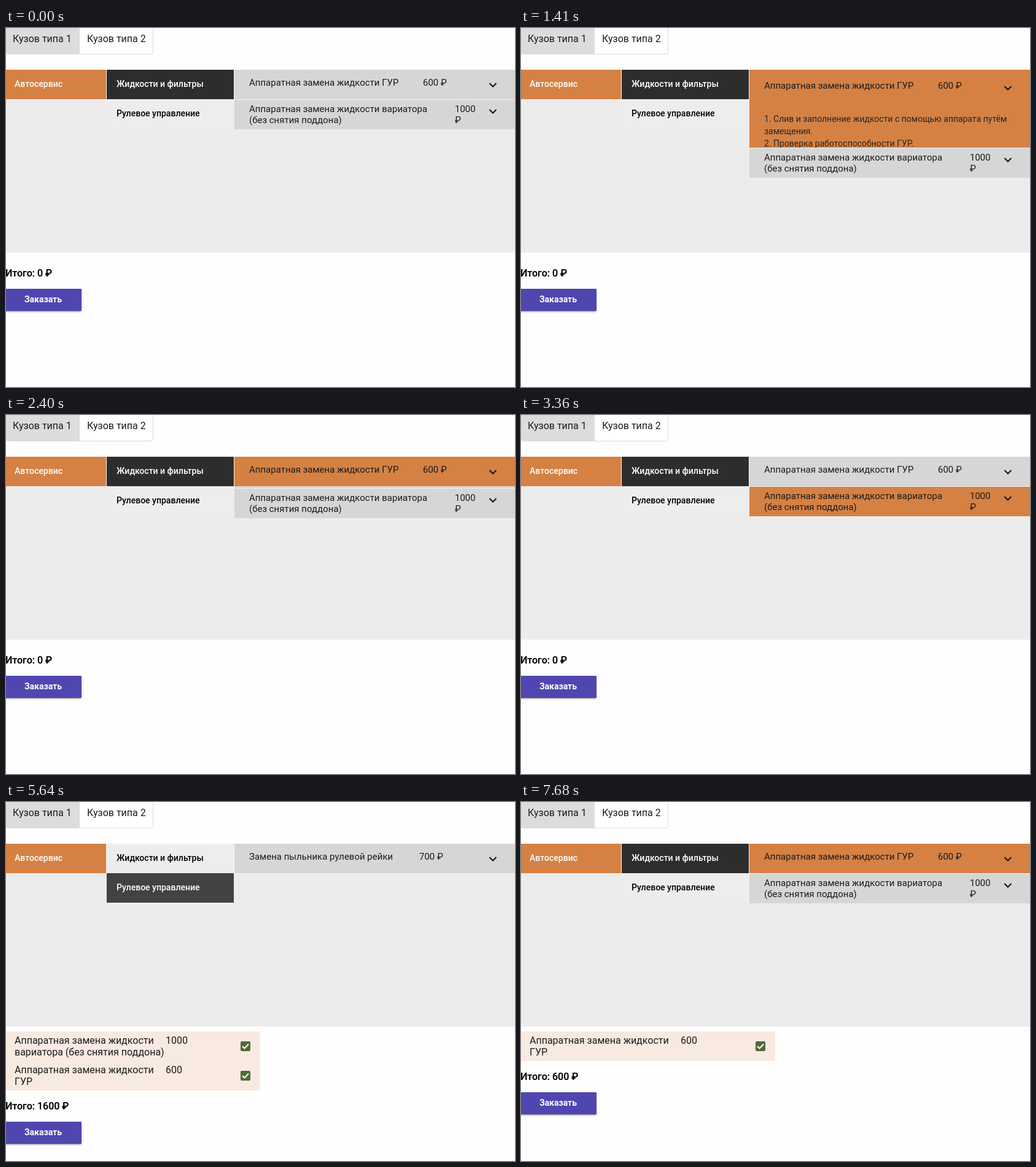
Write an HTML page that moves like this. It is 829x585 px and loops after 8000 ms.

```html
<!DOCTYPE html>
<html lang="ru">
<head>
<meta charset="utf-8">
<style>
html, body { margin: 0; width: 100%; height: 100%; overflow: hidden; background: #fefefe; }
#stage { position: relative; width: 829px; height: 585px; overflow: hidden; font: 15px Roboto, sans-serif; color: #1b1b1b; }
#stage div { position: absolute; box-sizing: border-box; white-space: nowrap; }
#stage svg { position: absolute; left: 786px; width: 14px; height: 10px; }
svg path { fill: none; stroke: #111; stroke-width: 2; }
.tabs { left: -1px; top: -6px; width: 241px; height: 49px; border: 1px solid #dcdce6; border-radius: 4px; background: #fff; overflow: hidden; }
.tabs div { left: 0; top: 0; width: 120px; height: 48px; background: #dcdcdc; }
.tab { top: 8px; font-size: 16px; line-height: 20px; }
.panel { left: 0; top: 68px; width: 829px; height: 298px; background: #ececec; }
.nav { height: 48px; line-height: 47px; font-size: 14px; font-weight: 500; overflow: hidden; }
.sub { left: 164px; width: 207px; }
.nav span { position: absolute; left: 16px; }
.ripple { border-radius: 50%; background: #fff; }
.row { left: 372px; width: 457px; height: 48px; overflow: hidden; }
.row svg { left: 414px !important; }
.name { left: 24px; line-height: 18px; }
.price { line-height: 18px; }
.body { left: 0; width: 457px; height: 124px; }
.body div { left: 24px; top: 13px; font-size: 14px; line-height: 20px; color: #262626; }
.item { left: 0; width: 414px; height: 48px; background: #f8eae1; font-size: 16px; line-height: 19px; }
.item div { top: 5px; }
#stage .box { left: 382px; top: 16px; width: 16px; height: 16px; border-radius: 2px; border: 2px solid #526a36; }
#stage .box svg { left: -2px; top: -2px; width: 16px; height: 16px; }
.box path { stroke: #fff; }
.total { left: -1px; font-size: 16px; font-weight: 500; line-height: 20px; color: #000; -webkit-text-stroke: .2px #000; }
.order { left: -2px; width: 125px; height: 36px; border-radius: 1px; background: #4f46b0; color: #fff; text-align: center; font-size: 14px; font-weight: 700; line-height: 35px;
  box-shadow: 0 3px 1px -2px rgba(0,0,0,.2), 0 2px 2px rgba(0,0,0,.14), 0 1px 5px rgba(0,0,0,.12); }
</style>
</head>
<body>
<div id="stage">
  <div class="tabs"><div></div></div>
  <div class="tab" style="left:11px">Кузов типа 1</div>
  <div class="tab" style="left:132px">Кузов типа 2</div>
  <div class="panel"></div>
  <div style="left:163px;top:68px;width:1px;height:48px;background:#f6f6f6"></div>
  <div style="left:371px;top:68px;width:1px;height:48px;background:#f6f6f6"></div>
  <div class="nav" style="left:0;top:68px;width:163px;background:#d58144;color:#fff"><span style="left:14px">Автосервис</span></div>
  <div class="nav sub" id="fluids" style="top:68px"><div class="ripple"></div><span>Жидкости и фильтры</span></div>
  <div class="nav sub" id="steering" style="top:116px"><div class="ripple"></div><span>Рулевое управление</span></div>
  <div id="line" style="left:372px;width:457px;height:1px;background:#f2f2f2"></div>
  <div class="row" id="rowA" style="top:68px">
    <div class="head" style="left:0;top:0;width:457px">
      <div class="name">Аппаратная замена жидкости ГУР</div>
      <div class="price" style="left:307px">600 ₽</div>
      <svg><path d="M1.5 2 7 7.5 12.5 2"/></svg>
    </div>
    <div class="body"><div>1. Слив и заполнение жидкости с помощью аппарата путём<br>замещения.<br>2. Проверка работоспособности ГУР.<br>3. Контроль уровня жидкости ГУР.</div></div>
  </div>
  <div class="row" id="rowB">
    <div class="name" style="top:6px">Аппаратная замена жидкости вариатора<br>(без снятия поддона)</div>
    <div class="price" style="left:359px;top:6px">1000<br>₽</div>
    <svg style="top:14px"><path d="M1.5 2 7 7.5 12.5 2"/></svg>
  </div>
  <div class="row" id="rowC" style="top:68px;background:#d6d6d6">
    <div class="name" style="top:12px">Замена пыльника рулевой рейки</div>
    <div class="price" style="left:301px;top:12px">700 ₽</div>
    <svg style="top:20px"><path d="M1.5 2 7 7.5 12.5 2"/></svg>
  </div>
  <div class="item" id="itemB" style="top:374px">
    <div style="left:14px">Аппаратная замена жидкости<br>вариатора (без снятия поддона)</div>
    <div style="left:260px">1000</div>
    <div class="box"><svg><path d="M3 8 6.5 11.5 13 4.5"/></svg></div>
  </div>
  <div class="item" id="itemA">
    <div style="left:14px">Аппаратная замена жидкости<br>ГУР</div>
    <div style="left:260px">600</div>
    <div class="box" style="background:#526a36"><svg><path d="M3 8 6.5 11.5 13 4.5"/></svg></div>
  </div>
  <div class="total" id="total"></div>
  <div class="order" id="order">Заказать</div>
</div>
<script>
const LOOP = 8000, STEP = 30;
const ORANGE = '#d58144', GRAY = '#d6d6d6', DARK = '#2d2d2d', LIGHT = '#ededed';
const TO_STEERING = 5430, TO_FLUIDS = 6900;
const $ = id => document.getElementById(id);
const clamp = x => Math.min(1, Math.max(0, x));
const within = (t, ...spans) => spans.some(([a, b]) => t >= a && t < b);

// Cubic Bezier easing with control heights 0 or 1, solved by bisection.
function bezier(x1, y1, x2, y2) {
  const at = (a, b, s) => 3 * (1 - s) * (1 - s) * s * a + 3 * (1 - s) * s * s * b + s * s * s;
  return x => {
    if (x <= 0 || x >= 1) return clamp(x);
    let lo = 0, hi = 1;
    for (let i = 0; i < 24; i++) {
      const mid = (lo + hi) / 2;
      if (at(x1, x2, mid) < x) lo = mid; else hi = mid;
    }
    return at(y1, y2, lo);
  };
}
const standard = bezier(.4, 0, .2, 1);
const decelerate = bezier(0, 0, .2, 1);

function nav(el, dark) {
  el.style.background = dark ? DARK : LIGHT;
  el.style.color = dark ? '#fff' : '#000';
}

function ripple(el, t, press, grow, fadeStart, fadeEnd) {
  const s = el.querySelector('.ripple').style;
  const r = 130 * decelerate(clamp((t - press) / grow));
  const fade = 1 - clamp((t - fadeStart) / (fadeEnd - fadeStart));
  s.left = 100 - r + 'px';
  s.top = 24 - r + 'px';
  s.width = s.height = 2 * r + 'px';
  s.opacity = .1 * fade;
}

function show(el, on) { el.style.display = on ? '' : 'none'; }

function rows(t) {
  const steering = within(t, [TO_STEERING, TO_FLUIDS]);
  const open = standard(clamp((t - 1325) / 225)) - standard(clamp((t - 2220) / 225));
  const height = Math.round(48 + 140 * open);
  const headHeight = Math.round(48 + 16 * open);
  const a = $('rowA'), b = $('rowB'), head = a.querySelector('.head');
  const hotA = within(t, [720, 3360], [4320, LOOP]);
  const hotB = within(t, [150, 720], [3360, 7680]);
  show(a, !steering);
  show(b, !steering);
  show($('rowC'), steering);
  a.style.height = height + 'px';
  a.style.background = hotA && t < 2220 ? ORANGE : GRAY;
  head.style.height = a.querySelector('.body').style.top = headHeight + 'px';
  head.style.background = hotA ? ORANGE : GRAY;
  head.querySelector('.name').style.top = head.querySelector('.price').style.top = headHeight / 2 - 12 + 'px';
  head.querySelector('svg').style.top = headHeight / 2 - 4 + 'px';
  b.style.top = 69 + height + 'px';
  b.style.background = hotB ? ORANGE : GRAY;
  $('line').style.top = 68 + height + 'px';
}

function cart(t) {
  const hasA = t >= 4680, hasB = within(t, [3930, 7680]);
  const shift = 48 * (hasA + hasB);
  const box = $('itemB').querySelector('.box');
  const checked = 1 - clamp((t - 7500) / 90);
  show($('itemA'), hasA);
  show($('itemB'), hasB);
  $('itemA').style.top = (hasB ? 422 : 374) + 'px';
  box.style.background = `rgba(82,106,54,${checked})`;
  box.firstChild.style.opacity = checked;
  $('total').textContent = `Итого: ${600 * hasA + 1000 * hasB} ₽`;
  $('total').style.top = 390 + shift + 'px';
  $('order').style.top = 425 + shift + 'px';
}

function draw(t) {
  nav($('fluids'), t < TO_STEERING || t >= 6630);
  nav($('steering'), within(t, [5040, TO_FLUIDS]));
  ripple($('steering'), t, 5290, 400, 5820, 6240);
  ripple($('fluids'), t, 6780, 400, 7050, 7350);
  rows(t);
  cart(t);
}

const start = performance.now();
function tick() {
  const t = (performance.now() - start) % LOOP;
  draw(Math.floor(t / STEP) * STEP);
  requestAnimationFrame(tick);
}
tick();
</script>
</body>
</html>
```
